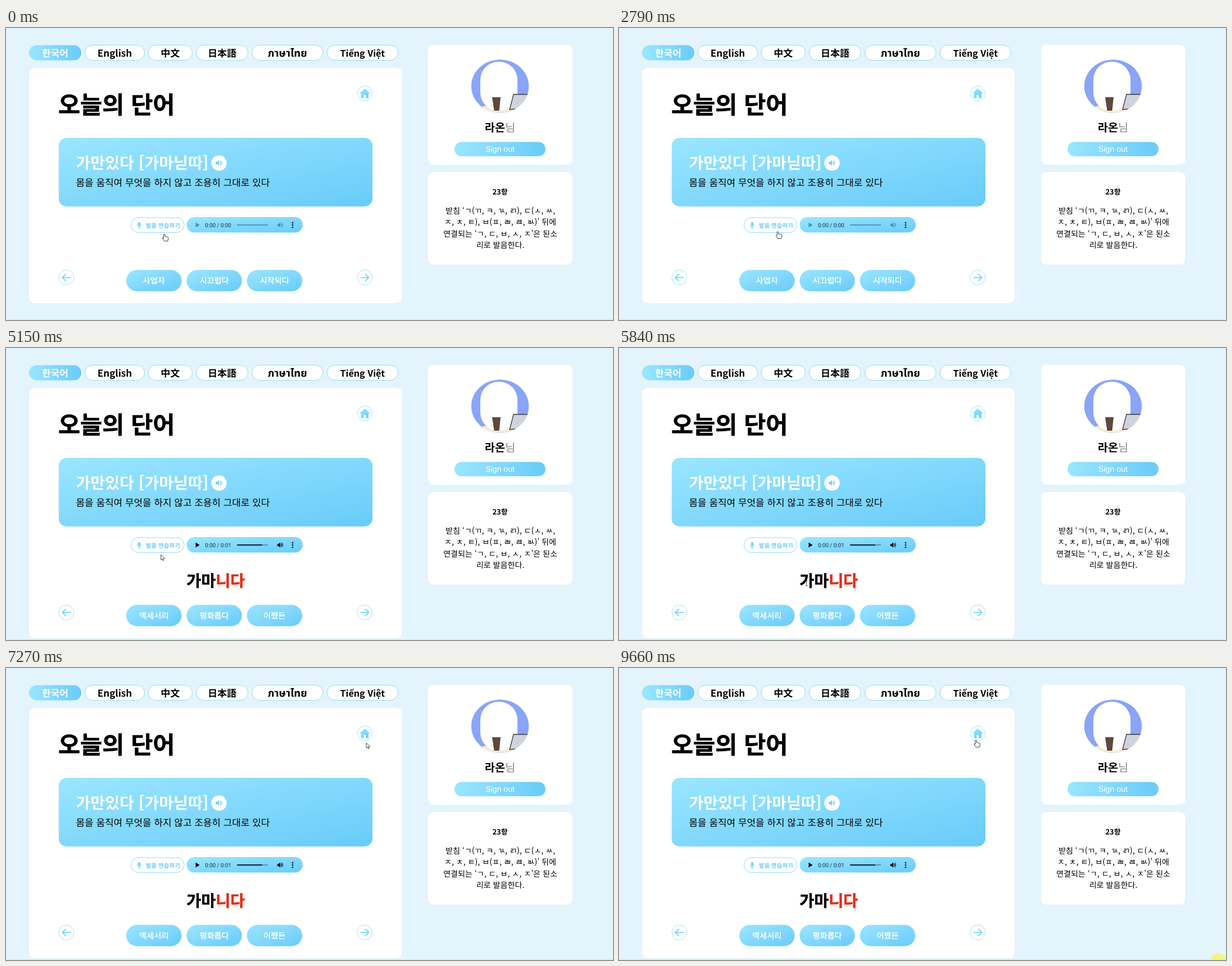
An HTML page for the animation above (9730 ms loop, 1080x519 px).

```html
<!DOCTYPE html>
<html lang="ko">
<head>
<meta charset="utf-8">
<title>오늘의 단어</title>
<style>
  html, body { margin: 0; width: 100%; height: 100%; overflow: hidden; background: #e4f4fc; }
  svg { display: block; width: 100vw; height: 100vh; }
  text { font-family: "Noto Sans CJK KR", "Noto Sans", "Noto Sans Thai", sans-serif; text-rendering: geometricPrecision; white-space: pre; }
  .mid { text-anchor: middle; }
  .bold { font-weight: 700; }
  .heavy { font-weight: 700; stroke: #000; stroke-width: .6; }
  .medium { stroke: #fff; stroke-width: .35; }
</style>
</head>
<body>
<svg viewBox="0 0 1080 519" preserveAspectRatio="none">
  <defs>
    <linearGradient id="diag" x1="0" y1="0" x2="1" y2="1">
      <stop offset="0" stop-color="#9ae6ff"/><stop offset="1" stop-color="#69cbfa"/>
    </linearGradient>
    <linearGradient id="side">
      <stop offset="0" stop-color="#9ae6ff"/><stop offset="1" stop-color="#69cbfa"/>
    </linearGradient>
    <clipPath id="face"><ellipse cx="879" cy="103.5" rx="51.2" ry="47.3"/></clipPath>
    <g id="ring"><circle r="13.3" fill="#fff" stroke="#a3e3fa"/></g>
    <g id="speaker">
      <path d="M-5.5-2h2.6l3.4-3.2v10.4L-2.9 2h-2.6z"/>
      <path d="M2-2.4q2 2.4 0 4.8M3.2-4.6q4.4 4.6 0 9.2" fill="none" stroke="currentColor" stroke-width="1.2"/>
    </g>
    <path id="arrowIcon" d="M7.5 0H-7M-.8-6.3-7.2 0l6.4 6.3" fill="none" stroke="#80d8fb" stroke-width="2.2"/>
  </defs>

  <rect width="1080" height="519" fill="#e4f4fc"/>
  <rect y="518" width="1080" height="1" fill="#d5e3ea"/>
  <g id="tabs"></g>
  <rect id="card" x="41" y="71" width="663" height="418" rx="10" fill="#fff"/>
  <text x="93" y="152" font-size="42.5" class="heavy">오늘의 단어</text>

  <rect x="93.8" y="195.2" width="558.2" height="122" rx="14" fill="url(#diag)"/>
  <text x="124.5" y="250" font-size="28.1" class="bold" fill="#fff">가만있다 [가마닏따]</text>
  <circle cx="379" cy="240" r="13.7" fill="#fff"/>
  <use href="#speaker" x="378.5" y="240" fill="#74d0f8" color="#74d0f8"/>
  <text x="124.5" y="281" font-size="16.95">몸을 움직여 무엇을 하지 않고 조용히 그대로 있다</text>

  <rect x="222.5" y="337" width="94.5" height="26.5" rx="13.25" fill="#fff" stroke="#8fdcf9"/>
  <g fill="#74d0f8" stroke="#74d0f8">
    <rect x="234.8" y="345" width="4.4" height="7.2" rx="2.2" stroke="none"/>
    <path d="M233 349.5q0 4.2 4 4.2t4-4.2M237 353.7v2.3M234.8 356h4.4" fill="none"/>
  </g>
  <text x="248.8" y="354.5" font-size="10.5" class="bold" fill="#69cbf6">발음 연습하기</text>

  <rect x="321.5" y="336" width="206.5" height="27.5" rx="13.75" fill="url(#diag)"/>
  <path id="play" d="M337.5 345.8l7 4.4-7 4.4z"/>
  <text id="clock" x="354" y="354" font-size="9.8" style="font-family:Roboto,sans-serif" fill="#15323f"></text>
  <rect x="411" y="349" width="55.5" height="2.2" rx="1" fill="#549ab9"/>
  <rect id="buffer" x="411" y="349" width="45" height="2.2" rx="1" fill="#14303c"/>
  <use id="volume" href="#speaker" transform="translate(487.6 350.2) scale(.88)"/>
  <g><circle cx="510" cy="346.2" r="1.2"/><circle cx="510" cy="350.2" r="1.2"/><circle cx="510" cy="354.2" r="1.2"/></g>

  <text id="heard" x="321.3" y="423.5" font-size="28.2" class="heavy">가마<tspan fill="#e22d18" stroke="#e22d18">니다</tspan></text>
  <g id="chips"></g>
  <g id="icons">
    <g transform="translate(638.3 116.5)">
      <use href="#ring"/>
      <path d="M0-9 9.4-.2H6.8V8.2H2V2.4h-4v5.8h-4.8V-.2h-2.6z" fill="url(#diag)"/>
    </g>
    <g id="steps">
      <g transform="translate(107.4 443.5)"><use href="#ring"/><use href="#arrowIcon"/></g>
      <g transform="translate(638.3 443.5)"><use href="#ring"/><use href="#arrowIcon" transform="scale(-1 1)"/></g>
    </g>
  </g>

  <rect x="751" y="30" width="256.5" height="212.5" rx="9" fill="#fff"/>
  <g clip-path="url(#face)">
    <rect x="827" y="55" width="104" height="98" fill="#8aa4f9"/>
    <ellipse cx="884" cy="151" rx="58" ry="15" fill="#f8eccb"/>
    <rect x="844" y="60" width="66" height="87" rx="32" fill="#fff"/>
    <path d="M865 123h15l-2.5 24h-9z" fill="#61473f"/>
    <path d="M903 118h30v23l-37 4z" fill="#d0d3dc" stroke="#33363d" stroke-width="1.3"/>
  </g>
  <text x="879" y="184.3" font-size="19.7" class="mid bold">라온<tspan fill="#888" font-weight="500">님</tspan></text>
  <rect x="798" y="202.5" width="162" height="25.5" rx="12.75" fill="url(#side)"/>
  <text x="879" y="220" font-size="14.2" class="mid" fill="#fff" style="font-family:'Liberation Sans',Arial,sans-serif">Sign out</text>

  <rect x="751" y="256" width="256.5" height="164.5" rx="9" fill="#fff"/>
  <text x="879" y="296.3" font-size="12.8" class="mid bold">23항</text>
  <g id="rule"></g>

  <circle id="spot" cx="1066" cy="520.5" r="13.3" fill="#f2f57a"/>
  <g id="cursor" stroke-linejoin="round">
    <path id="hand" d="M-1.2 6V1Q0-.8 1.2 1V4.6Q2.5 3.9 3.4 5 4.8 4.5 5.5 5.6 7.2 5.4 7.2 7.2V9.2Q7 11 6 12.8H.4Q-1.2 10.4-3.2 7.8-3.2 5.8-1.2 7.4z" fill="#fff" stroke="#222" stroke-width=".9"/>
    <path id="pointer" d="M0 0V9.3L2.2 7.4 3.7 10.7 5.1 10.1 3.7 6.9H6.6z" fill="#fff" stroke="#222" stroke-width=".8"/>
    <path id="beam" d="M-2-4.5h4M0-4.5v9M-2 4.5h4" fill="none" stroke="#333" stroke-width=".9"/>
  </g>
</svg>
<script>
const LOOP = 9730, RESULT = 4730, LOADED = 4790, ICONS = 5080, SPOT = 9660;
const $ = id => document.getElementById(id);

function add(parent, tag, attrs, label) {
  const el = document.createElementNS("http://www.w3.org/2000/svg", tag);
  for (const k in attrs) el.setAttribute(k, attrs[k]);
  if (label) el.textContent = label;
  return $(parent).appendChild(el);
}
const show = (id, on) => $(id).setAttribute("visibility", on ? "visible" : "hidden");
const shift = (id, x, y) => $(id).setAttribute("transform", `translate(${x} ${y})`);

// label, left edge, width, font size
[["한국어", 41, 93, 17], ["English", 140.5, 106, 17], ["中文", 253, 78.5, 17], ["日本語", 338.5, 92, 17],
 ["ภาษาไทย", 437.5, 126.5, 18.4], ["Tiếng Việt", 571, 126.5, 16.1]].forEach(([label, x, width, size], i) => {
  add("tabs", "rect", { x, y: 30.4, width, height: 27, rx: 13.5,
    fill: i ? "#fff" : "url(#side)", stroke: i ? "#8fdcf9" : "none" });
  add("tabs", "text", { x: x + width / 2, y: 50.7, "font-size": size, "font-weight": 600,
    class: "mid", fill: i ? "#000" : "#fff" }, label);
});

["받침 ‘ㄱ(ㄲ, ㅋ, ㄳ, ㄺ), ㄷ(ㅅ, ㅆ,", "ㅈ, ㅊ, ㅌ), ㅂ(ㅍ, ㄼ, ㄿ, ㅄ)’ 뒤에",
 "연결되는 ‘ㄱ, ㄷ, ㅂ, ㅅ, ㅈ’은 된소", "리로 발음한다."].forEach((line, i) =>
  add("rule", "text", { x: 879.5, y: 330 + i * 20.4, "font-size": 14.1, class: "mid" }, line));

const words = [["사업자", "시끄럽다", "시작되다"], ["액세서리", "평화롭다", "어쨌든"]];
const chips = words[0].map((word, i) => {
  const x = 214 + i * 107.3;
  add("chips", "rect", { x, y: 430, width: 98.5, height: 38, rx: 19, fill: "url(#diag)" });
  return add("chips", "text", { x: x + 49.2, y: 454.3, "font-size": 14.2,
    class: "mid medium", fill: "#fff" });
});

// time, x, y, cursor shape from that time on
const path = [
  [0, 281.5, 366, "hand"], [2250, 281.5, 366, "hand"], [2790, 282.5, 361.5, "hand"],
  [4730, 280.5, 361.5, "pointer"], [5080, 280.5, 361.5, "pointer"], [5570, 247, 402, "pointer"],
  [5710, 262, 410, "pointer"], [5820, 329.5, 419, "beam"], [5900, 345, 415, "beam"],
  [6060, 425, 385, "pointer"], [6670, 652.5, 280, "pointer"], [6850, 667, 240, "pointer"],
  [7200, 646, 145, "pointer"], [7300, 639, 128, "hand"], [7490, 638, 126, "hand"],
  [7620, 635.5, 125, "hand"], [7970, 635.5, 125, "hand"], [8010, 636, 125, "hand"],
  [8150, 636, 125, "hand"], [8210, 637, 126.5, "hand"], [9070, 637, 126.5, "hand"],
  [9200, 635, 128, "hand"], [LOOP, 635, 128, "hand"]
];

function moveCursor(t) {
  let i = path.length - 2;
  while (path[i][0] > t) i--;
  const [t0, x0, y0, shape] = path[i], [t1, x1, y1] = path[i + 1];
  // the pointer rests while the answer is being fetched
  const k = t0 === 2790 ? 0 : (t - t0) / (t1 - t0);
  shift("cursor", x0 + (x1 - x0) * k, y0 + (y1 - y0) * k);
  for (const id of ["hand", "pointer", "beam"]) show(id, id === shape);
}

function draw(t) {
  const result = t >= RESULT, loaded = t >= LOADED;
  const drop = result ? 26.5 : 0;
  $("card").setAttribute("height", 418 + drop);
  shift("chips", 0, drop);
  shift("steps", 0, drop);
  chips.forEach((chip, i) => { chip.textContent = words[+result][i]; });
  show("heard", result);
  show("icons", !result || t >= ICONS);
  $("play").setAttribute("fill", result ? "#000" : "#4c8fac");
  $("clock").textContent = loaded ? "0:00 / 0:01" : "0:00 / 0:00";
  show("buffer", loaded);
  const ink = loaded ? "#000" : "#4c8fac";
  $("volume").setAttribute("fill", ink);
  $("volume").setAttribute("color", ink);
  show("spot", t >= SPOT);
  moveCursor(t);
}

const start = performance.now();
function tick() {
  draw((performance.now() - start) % LOOP);
  requestAnimationFrame(tick);
}
tick();
</script>
</body>
</html>
```
